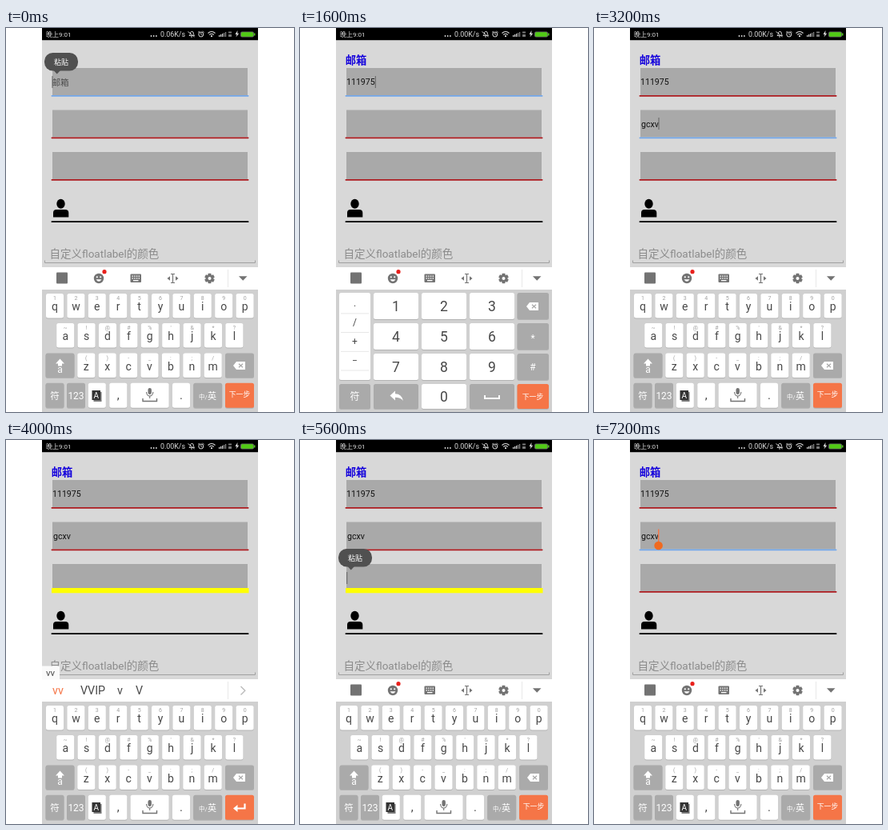
An HTML page for the animation above (8 s loop, 360x480 px).

```html
<!DOCTYPE html>
<html lang="zh">
<head>
<meta charset="utf-8">
<style>
html, body { margin: 0; width: 100%; height: 100%; overflow: hidden; background: #fff; }
svg { display: block; width: 360px; height: 480px; font-family: Roboto, "Noto Sans CJK SC", "Noto Sans CJK", sans-serif; }
text { white-space: pre; }
</style>
</head>
<body>
<svg id="stage" viewBox="0 0 360 480"></svg>
<script>
const BLUE = '#73a7ea', RED = '#ad1a1f', ORANGE = '#f57547', GRAY = '#aaa', ICON = '#737373', INK = '#484848';
const STEP = 800;

const rect = (x, y, w, h, fill, r = 0) => `<rect x="${x}" y="${y}" width="${w}" height="${h}" rx="${r}" fill="${fill}"/>`;
const circle = (x, y, r, fill) => `<circle cx="${x}" cy="${y}" r="${r}" fill="${fill}"/>`;
const shape = (d, fill) => `<path d="${d}" fill="${fill}"/>`;
const line = (d, color, w = 1) => `<path d="${d}" fill="none" stroke="${color}" stroke-width="${w}"/>`;
const text = (x, y, s, size, fill, anchor = 'start', weight = 400) =>
  `<text x="${x}" y="${y}" font-size="${size}" fill="${fill}" text-anchor="${anchor}" font-weight="${weight}">${s.replace(/&/g, '&amp;').replace(/</g, '&lt;')}</text>`;
const mid = (x, y, s, size, fill) => text(x, y, s, size, fill, 'middle');
const key = (x, y, w, h, fill = '#fff') => rect(x, y + 1, w, h, '#b3b3b3', 2.5) + rect(x, y, w, h, fill, 2.5);

// focus: 0-3 is the active field; caret: [x, y]; bubble: y of its top
const base = { speed: '0.00', values: ['111975', 'gcxv', ''], focus: 1, pad: 'letters' };
const scenes = [
  { speed: '0.06', values: ['', '', ''], focus: 0, caret: [58, 60], bubble: 31 },
  { speed: '0.06', values: ['11', '', ''], focus: 0, caret: [70, 60], pad: 'digits', pressed: '1' },
  { values: ['111975', '', ''], focus: 0, caret: [94.3, 60], pad: 'digits' },
  { values: ['111975', '', ''], caret: [58.7, 112], typing: 'g',
    words: [[58, 'g'], [86, 'gggg'], [133, 'ggggg'], [188, 'go'], [219, 'good'], [266, 'GO']] },
  { caret: [81, 112] },
  { focus: 2, typing: 'vv', last: true, words: [[58, 'vv'], [93, 'VVIP'], [139, 'v'], [162, 'V']] },
  { focus: 3 },
  { focus: 2, caret: [58.7, 165], bubble: 136 },
  { caret: [81, 112] },
  { handle: true }
].map(s => ({ ...base, ...s }));

function statusBar(s) {
  const w = '#ddd';
  let out = rect(45, 0, 270, 15.5, '#000') + text(50, 10.8, '晚上9:01', 8, w);
  for (const x of [181.5, 184.7, 187.9]) out += circle(x, 10, .9, w);
  out += text(193, 10.8, s.speed + 'K/s', 8.9, w);
  out += line('M229 9.5Q231 8 230.5 5.5Q232 3.5 234 5L234.5 8L235.5 9.5ZM227.5 4.5L235.5 11M231 11H233', w, .9);
  out += `<circle cx="243.8" cy="8" r="3" fill="none" stroke="${w}"/>` + line('M243.8 6V8L245.5 9M240 5.5L242 4M245.5 4L247.5 5.5', w, .8);
  out += line('M252.5 6.5Q257 2.5 261.5 6.5M254.3 8.5Q257 6 259.7 8.5', w, 1.1) + circle(257, 10.2, 1.1, w);
  for (let i = 0; i < 5; i++) out += rect(266 + i * 2, 9 - i, 1.2, 2 + i, i < 3 ? w : '#888');
  out += rect(278, 4.5, 4, 2, '#777') + rect(278, 8, 4, 3, '#777');
  out += shape('M289.5 3L286.5 8H288.5L287.5 11.5L291.2 6.8H289.2Z', w);
  return out + rect(293, 4.5, 17, 7, '#666', 2) + rect(294, 5.2, 15, 5.6, '#51c916', 1.5) + rect(310, 6.5, 1.5, 3, '#51c916');
}

function form(s) {
  let out = rect(45, 15.5, 270, 284, '#d8d8d8');
  [50, 102.5, 155].forEach((y, i) => {
    const focused = s.focus === i;
    out += rect(58, y, 244, 34, '#a9a9a9');
    out += focused && i === 2
      ? rect(57, 185, 246.5, 6.3, '#ff0')
      : rect(56.5, y + 34, 247, 1.8, focused ? BLUE : RED, .8);
    out += text(i ? 59 : 58, y + 21.3, s.values[i], 10.6, '#111');
  });
  out += s.values[0]
    ? text(56.8, 45, '邮箱', 13.3, '#1400dc', 'start', 700)
    : text(57.5, 71.5, '邮箱', 10.6, '#4a4a4a');
  out += `<ellipse cx="68.5" cy="219.8" rx="5.2" ry="6" fill="#000"/>` + shape('M59 236.5V231Q59 227 63 227H74Q78.3 227 78.3 231V236.5Z', '#000');
  out += rect(56.5, 241.3, 247, 1.8, s.focus === 3 ? BLUE : '#000', .8);
  out += text(54.5, 287, '自定义floatlabel的颜色', 13.5, '#8b8b8b') + line('M48.5 290.5V293.5H311.5V290.5', '#a0a0a0');
  if (s.caret) out += rect(s.caret[0] - .5, s.caret[1], 1, 15, '#606060');
  if (s.handle) out += rect(80, 111.5, 1.4, 17, ORANGE) + circle(80.6, 132, 5.3, '#f06a20');
  if (s.bubble) {
    const y = s.bubble;
    out += rect(48, y, 42, 22.5, '#505050', 10.5) + shape(`M59.5 ${y + 22}H68L63.7 ${y + 26.5}Z`, '#505050');
    out += mid(69, y + 14.7, '粘贴', 9, '#fff');
  }
  return out;
}

function toolbar(s) {
  let out = rect(45, 299, 270, 28, '#fff');
  if (s.words) {
    out += rect(45, 282.5, s.typing.length > 1 ? 22 : 17, 17, '#fafafa') + text(50, 295, s.typing, 11.5, INK);
    s.words.forEach(([x, word], i) => out += text(x, 318.3, word, 14.3, i ? INK : ORANGE));
    out += rect(278, 300, 37, 26, '#fff');
    if (s.last) out += rect(277, 302, 1, 22, '#e8e8e8');
    return out + line('M293.5 308L298.8 313.3L293.5 318.6', s.last ? '#bbb' : '#777', 1.4);
  }
  out += rect(63, 305.5, 14, 14, ICON, 1);
  out += circle(116, 313, 6.2, ICON) + circle(113.8, 311.3, 1.1, '#fff') + circle(118.2, 311.3, 1.1, '#fff') +
    shape('M112.5 314.2H119.5Q116 319.5 112.5 314.2Z', '#fff') + circle(123, 304.7, 2.6, '#e8201c');
  out += rect(155.5, 307.5, 13.5, 10.5, ICON, 1);
  for (let i = 0; i < 8; i++) out += rect(157.5 + i % 4 * 2.7, 309.5 + (i >> 2) * 2.7, 1.4, 1.4, '#fff');
  out += rect(159, 315, 6.5, 1.3, '#fff');
  out += line('M206 307.5H211M208.5 307.5V318.5M206 318.5H211', ICON, 1.2) +
    shape('M205 310.3V315.7L201.5 313ZM212 310.3V315.7L215.5 313Z', ICON);
  for (let a = 0; a < 180; a += 60) out += `<g transform="rotate(${a} 254.5 313)">${rect(252.5, 306.7, 4, 12.6, ICON, .8)}</g>`;
  out += circle(254.5, 313, 4.8, ICON) + circle(254.5, 313, 2, '#fff');
  return out + rect(277, 302, 1, 22, '#e8e8e8') + shape('M291 310.3H301.5L296.2 315.8Z', ICON);
}

const backspace = (x, y) =>
  shape(`M${x - 8} ${y}L${x - 4} ${y - 5}H${x + 7}V${y + 5}H${x - 4}Z`, '#fff') +
  line(`M${x - 1} ${y - 2.3}L${x + 4} ${y + 2.3}M${x + 4} ${y - 2.3}L${x - 1} ${y + 2.3}`, GRAY, 1.3);

function letters(s) {
  let out = '';
  const rows = [
    [50, 332, 'qwertyuiop', '1234567890'],
    [63.2, 369, 'asdfghjkl', "~!@#%'&*?"],
    [89.3, 406.5, 'zxcvbnm', '()-_:;/']
  ];
  for (const [x0, y, chars, hints] of rows) {
    [...chars].forEach((c, i) => {
      const x = x0 + i * 26.4;
      out += key(x, y, 22, 30.5) + mid(x + 11, y + 8, hints[i], 7, '#a0a0a0') + mid(x + 11, y + 21, c, 14, INK);
    });
  }
  out += key(49.5, 406.5, 36, 30.5, GRAY) + shape('M67.5 413.5L73 419.5H70V422.5H65V419.5H62Z', '#fff') + mid(67.5, 431, 'a', 12, '#fff');
  out += key(274, 406.5, 36, 30.5, GRAY) + backspace(292, 422);
  const bottom = [[49.5, 23, GRAY], [76, 23, GRAY], [102.8, 22], [129.3, 22], [155.6, 48], [208, 22], [234.2, 36, GRAY], [274, 36, ORANGE]];
  for (const [x, w, fill] of bottom) out += key(x, 443.8, w, 31, fill);
  out += mid(61, 463.5, '符', 11.5, '#fff') + mid(87.5, 463.5, '123', 12, '#fff');
  out += rect(109.5, 455, 10, 12, '#777') + rect(107.5, 453, 10.5, 12, '#333') + mid(112.8, 462.7, 'A', 10, '#fff');
  out += mid(140.3, 464, ',', 15, INK) + mid(219, 464, '.', 15, INK);
  out += rect(177.5, 450, 4.4, 8, ICON, 2.2) + line('M175.5 455Q176 460 179.7 460Q183.4 460 183.9 455M179.7 460V463', ICON, 1.1) +
    line('M171 463V466.5H188.5V463', ICON, 1.4);
  out += text(241, 463.5, '中/', 7.5, '#fff') + text(252, 463.5, '英', 11, '#fff');
  return out + (s.words
    ? line('M298.5 454.5V460.5H287', '#fff', 2.2) + shape('M284 460.5L289.5 456V465Z', '#fff')
    : mid(292, 461.2, '下一步', 8.8, '#fff'));
}

function digits(s) {
  let out = key(49, 331, 39, 109);
  [...'./+−'].forEach((c, i) => out += mid(68.5, [348, 372, 396, 420][i], c, 12, INK) + rect(51, 356.5 + i * 23.7, 35, .8, '#e2e2e2'));
  for (let i = 0; i < 9; i++) {
    const x = 92 + i % 3 * 60, y = 331 + Math.floor(i / 3) * 38, n = String(i + 1);
    out += key(x, y, 56, 33, s.pressed === n ? '#dedede' : '#fff') + mid(x + 28, y + 22.8, n, 17.5, INK);
  }
  ['', '*', '#'].forEach((c, i) => {
    const y = 331 + i * 38;
    out += key(271.5, y, 39.5, 33, GRAY) + (c ? mid(291, y + (c === '*' ? 23 : 21), c, 12, '#fff') : backspace(291, y + 17));
  });
  const bottom = [[49, 39, GRAY], [92, 56, GRAY], [152, 56], [212, 56, GRAY], [271.5, 39.5, ORANGE]];
  for (const [x, w, fill] of bottom) out += key(x, 445, w, 31, fill);
  out += mid(68.5, 465, '符', 12, '#fff') + mid(180, 466.5, '0', 17.5, INK) + mid(291, 463.7, '下一步', 8.8, '#fff');
  out += shape('M112.5 459.5L119 453.5V457.3Q127 457.3 129 466Q125.5 461.8 119 461.8V465.5Z', '#fff');
  return out + line('M231 459V463H249V459', '#fff', 2);
}

const stage = document.getElementById('stage');
const draw = s => statusBar(s) + form(s) + toolbar(s) + rect(45, 327, 270, 153, '#d0d0d0') + (s.pad === 'digits' ? digits(s) : letters(s));

let shown = -1;
function tick() {
  const index = Math.floor(performance.now() / STEP) % scenes.length;
  if (index !== shown) stage.innerHTML = draw(scenes[shown = index]);
  requestAnimationFrame(tick);
}
tick();
</script>
</body>
</html>
```
